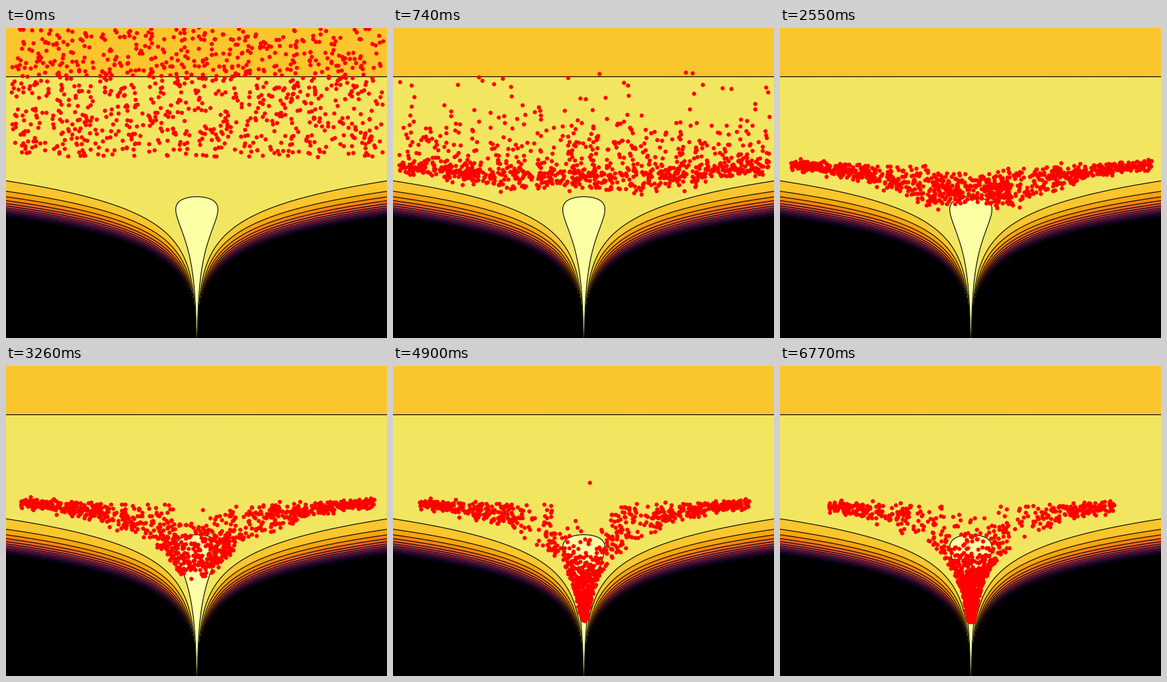
Recreate the animation shown at these times as a matplotlib script. Size 560x455 px, loop 6.8 s.

```python
import matplotlib.pyplot as plt
import numpy as np
from matplotlib.animation import FuncAnimation

W, H, DPI = 560, 455, 100
FRAMES, LOOP = 240, 6800
CX = 280.5
COUNT, HIGH = 1000, 25

rng = np.random.default_rng(7)

fig = plt.figure(figsize=(W / DPI, H / DPI), dpi=DPI, facecolor="black")
ax = fig.add_axes([0, 0, 1, 1])
ax.set(xlim=(0, W), ylim=(H, 0))
ax.axis("off")


def log_density(x, y):
    """Funnel log density, zero on the innermost contour."""
    d = (y - 247.6) / 19
    return d - 0.0085 * d**2 - 3.8e-4 * (x - CX) ** 2 * np.exp(d)


gx, gy = np.meshgrid(np.linspace(0, W, 2 * W + 1), np.linspace(0, H, H + 1))
z = log_density(gx, gy)
levels = np.arange(-140, 1, 10)
bands = plt.get_cmap("inferno")(np.linspace(0, 1, len(levels) + 1))[1:]
ax.contourf(gx, gy, z, levels=levels, colors=bands, extend="max")
ax.contour(gx, gy, z, levels=levels, colors="black",
           linewidths=0.8, linestyles="solid")

# Starting cloud: an even block plus a few stragglers above the stage
u0 = rng.uniform(-274, 274, COUNT)
y0 = rng.uniform(0, 189, COUNT)
y0[:HIGH] = -60 * rng.random(HIGH) ** 1.5
rate = 0.011 + 0.02 * rng.beta(1.5, 1.5, COUNT)
rate[:HIGH] = 0.0125
side = np.sign(u0)

early = rng.beta(1.3, 1.6, COUNT)
late = rng.beta(2, 1.2, COUNT)
spread = 0.95 * rng.random(COUNT)
jitter = rng.normal(0, 3, COUNT)
arrival = np.abs(u0) / 0.735

# One particle is thrown out of the neck and sinks back
stray = np.argmin(np.abs(u0 - 8.5))


def wall_y(u):
    return 212 + 45.5 * np.log(205 / np.maximum(u, 1))


def wall_u(y):
    return 205 * np.exp((212 - y) / 45.5)


def soft_min(a, b, k=4):
    return -k * np.logaddexp(-a / k, -b / k)


def positions(n):
    # Free fall under the Gaussian prior
    v = (273 - y0) / 22.75
    fall = 273 - 22.75 * ((v + 4.5) * np.exp(-rate * n) - 4.5)

    # Inward drift, then descent into the neck behind a moving front
    u = np.sqrt(np.maximum(u0**2 - 0.54 * n**2, 0))
    front = 235 + 175 / (1 + np.exp((115 - n) / 16))
    top = 205 - 8 * (u / 270) ** 2
    floor = np.maximum(np.minimum(wall_y(u), front), top)
    age = np.maximum(n - arrival, 0)
    depth = early + (late - early) * (1 - np.exp(-age / 80))
    rest = top + (floor - top) * depth

    # The cloud overshoots a little when it lands
    sag = np.exp(-n / 40)
    loose = np.clip((300 - rest) / 60, 0, 1)
    rest += loose * (10 * sag + jitter * (1 + 1.5 * sag))

    width = spread * np.minimum(wall_u(rest), 60) * min(n / 80, 1)
    x = CX + side * np.maximum(u, width)
    y = soft_min(fall, rest)

    if n >= 108:
        x[stray] = 289
        y[stray] = 135 + max(3.3 * (138 - n), 1.05 * (n - 138))
    return x, y


dots, = ax.plot([], [], "o", color="red", ms=4.4, mew=0, zorder=5)


def update(n):
    dots.set_data(*positions(n))
    return dots,


anim = FuncAnimation(fig, update, frames=FRAMES, interval=LOOP / FRAMES,
                     repeat=True, repeat_delay=0, blit=True)
plt.show()
```
